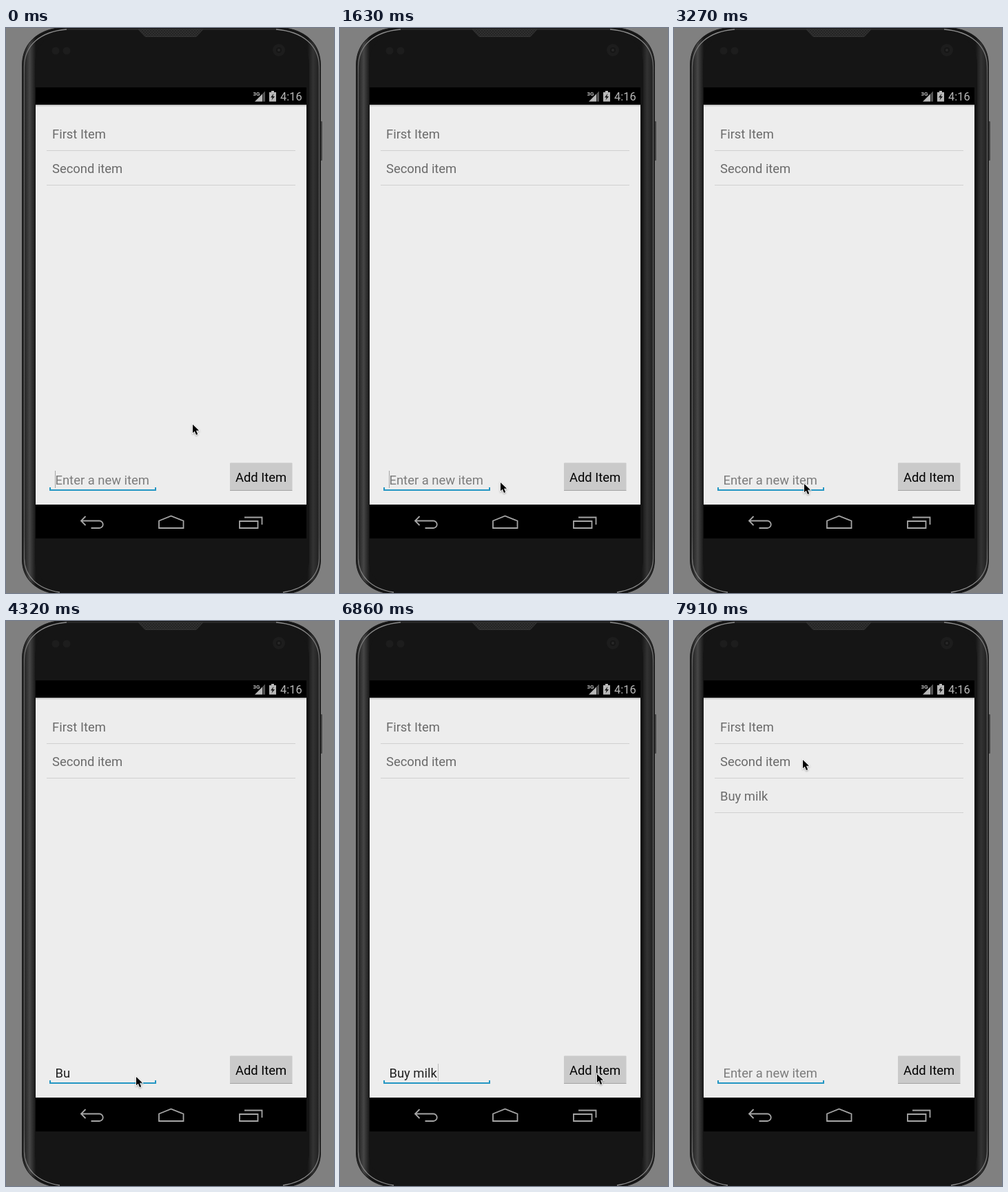
An HTML page that plays this animation: 476 by 818 pixels, repeating every 8 s.

```html
<!DOCTYPE html>
<html lang="en">
<head>
<meta charset="utf-8">
<title>Item list</title>
<style>
html, body { margin: 0; width: 100%; height: 100%; overflow: hidden; background: #808080; }
svg { display: block; width: 476px; height: 818px; font: 18.4px Roboto, sans-serif; }
.list { fill: #6b6b6b; }
.rule { stroke: #d0d0d0; }
.icon { fill: none; stroke: #a6a6a6; stroke-width: 1.8; }
text { white-space: pre; }
</style>
</head>
<body>
<svg viewBox="0 0 476 818">
  <defs>
    <linearGradient id="body">
      <stop offset="0" stop-color="#1c1c1c"/>
      <stop offset=".012" stop-color="#2c2c2c"/>
      <stop offset=".025" stop-color="#464646"/>
      <stop offset=".046" stop-color="#151515"/>
      <stop offset=".956" stop-color="#151515"/>
      <stop offset=".975" stop-color="#333"/>
      <stop offset="1" stop-color="#1c1c1c"/>
    </linearGradient>
    <linearGradient id="rim" x1="0" y1="0" x2="0" y2="1">
      <stop offset="0" stop-color="#909090"/>
      <stop offset=".08" stop-color="#606060"/>
      <stop offset=".9" stop-color="#585858"/>
      <stop offset="1" stop-color="#909090"/>
    </linearGradient>
    <linearGradient id="shade" x1="0" y1="0" x2="0" y2="1">
      <stop offset="0" stop-color="#000" stop-opacity=".25"/>
      <stop offset="1" stop-color="#000" stop-opacity="0"/>
    </linearGradient>
    <pattern id="mesh" width="4" height="4" patternUnits="userSpaceOnUse">
      <path d="M0 4L4 0M0 0L4 4" stroke="#343434" stroke-width=".8"/>
    </pattern>
  </defs>

  <!-- handset -->
  <rect x="456" y="135" width="3" height="57" rx="1" fill="#444"/>
  <path fill="url(#body)" stroke="#1b1b1b" d="M82-1C46 2 23.500 22 23.500 54V770C23.500 796 42 816 76 820H404C438 816 456.500 796 456.500 770V54C456.500 22 434 2 398-1Z"/>
  <path fill="#151515" d="M88 4C56 8 42 28 42 54V770C42 792 56 810 84 815H396C424 810 440 792 440 770V54C440 28 424 8 392 4Z"/>
  <path fill="none" stroke="url(#rim)" stroke-width="1.300" d="M88 2C50 5 26.500 25 26.500 56V768C26.500 792 44 812 78 817M392 2C430 5 454.500 25 454.500 56V768C454.500 792 436 812 402 817"/>
  <path fill="none" stroke="#3c3c3c" d="M88 2H392"/>
  <path fill="#242424" stroke="#343434" d="M192 2H286L276 12.500H202Z"/>
  <path fill="url(#mesh)" d="M192 2H286L276 12.500H202Z"/>
  <g fill="#1d1d1d">
    <circle cx="72" cy="33" r="5.500"/>
    <circle cx="88" cy="33" r="5.500"/>
    <circle cx="396" cy="32" r="9"/>
  </g>
  <circle cx="396" cy="32" r="4" fill="#161616"/>
  <circle cx="396" cy="32" r="2" fill="#282828"/>

  <!-- screen -->
  <rect x="43" y="86" width="393" height="653"/>
  <rect x="43" y="111" width="393" height="579" fill="#ededed"/>
  <rect x="43" y="111" width="393" height="3" fill="url(#shade)"/>

  <!-- status bar -->
  <g fill="#b8b8b8">
    <text x="358.500" y="97.500" font-size="8" font-weight="700">3G</text>
    <path d="M361 106.500L372 95.500V106.500Z"/>
    <path fill="#555" d="M372.500 95L376 91.500V106.500H372.500Z"/>
    <path d="M385 91H389V93H392V106.500H382V93H385Z"/>
    <path fill="#111" d="M388.500 95L384 100.500H386.800L385.500 104.500L390 99H387.200Z"/>
    <text x="398" y="105" font-size="16.400">4:16</text>
  </g>

  <!-- list -->
  <g class="list">
    <text x="67" y="159.500">First Item</text>
    <text x="67" y="209.500">Second item</text>
  </g>
  <path class="rule" d="M59 177.500H420M59 227.500H420"/>
  <g id="added">
    <text class="list" x="67" y="259.500">Buy milk</text>
    <path class="rule" d="M59 277.500H420"/>
  </g>

  <!-- input row -->
  <path fill="none" stroke="#2496c3" stroke-width="2" d="M64 665V669H217V665"/>
  <text id="field" x="71.500" y="660.500"></text>
  <rect id="caret" y="641" width="1" height="25"/>
  <rect x="325" y="629.500" width="90.500" height="40" rx="1" fill="#cacaca"/>
  <path stroke="#a4a4a4" d="M325 669.500H415.500"/>
  <text x="333" y="656.500">Add Item</text>

  <!-- navigation bar -->
  <g class="icon">
    <path d="M115.500 707L109 713.500L115.500 720M109.500 713.500H135.500A5.200 5.200 0 0 1 135.500 724H123.500"/>
    <path d="M222 724V713.500L239.500 706.500L257.500 713.500V724Z"/>
    <path d="M339 714H365.500V724H339ZM346 708.500H371.500V719"/>
  </g>

  <path id="pointer" stroke="#fff" stroke-width="1.600" paint-order="stroke" style="filter:drop-shadow(0 1px 1px #0005)" d="M0 .5V12.800L2.800 10.200L5 15.400L7.200 14.400L5 9.300H9Z"/>
</svg>
<script>
const LOOP = 8000, ADDED = 7160;
const HINT = 'Enter a new item';

// time, typed text, caret x, caret opacity
const typing = [
  [0, '', 71, .3], [140, '', 71, 0], [740, '', 71, .3], [1190, '', 71, 0],
  [1630, '', 71, .3], [2220, '', 71, 0], [2670, '', 71, .3], [3270, '', 71, 0],
  [3420, 'B', 83, .5], [3720, 'Bu', 93, .5], [4320, 'Bu', 93, 0], [4770, 'Bu', 93, .5],
  [4920, 'Buy', 102, .5], [5060, 'Buy ', 107, .5], [5360, 'Buy m', 123, .5],
  [5510, 'Buy mi', 128, .6], [6110, 'Buy mi', 128, 0], [6260, 'Buy mil', 132, .4],
  [6410, 'Buy milk', 142, .2], [7010, 'Buy milk', 142, 0],
  [ADDED, '', 71, .3], [7760, '', 71, 0]
];

// time, pointer tip x, y
const moves = [
  [0, 271, 573.5], [740, 280, 605], [890, 312, 690], [1040, 346, 755], [1190, 338, 748],
  [1330, 305, 712], [1480, 262, 673], [1630, 233, 657.5], [1780, 220, 658],
  [1920, 202, 659], [2070, 189, 659.5], [6710, 300, 657], [6860, 373, 655.5],
  [7310, 353, 602], [7760, 280, 415], [7910, 187, 200.5]
];

const byId = id => document.getElementById(id);
const added = byId('added'), field = byId('field'), caret = byId('caret'), pointer = byId('pointer');
const stepAt = (steps, t) => steps.findLast(s => s[0] <= t);

function draw(t) {
  const [, text, caretX, alpha] = stepAt(typing, t);
  field.textContent = text || HINT;
  field.setAttribute('fill', text ? '#222' : '#7c7c7c');
  caret.setAttribute('x', caretX);
  caret.setAttribute('opacity', alpha);
  added.setAttribute('visibility', t >= ADDED ? 'visible' : 'hidden');
  const [, x, y] = stepAt(moves, t);
  pointer.setAttribute('transform', `translate(${x} ${y})`);
}

const start = performance.now();
function tick() {
  draw((performance.now() - start) % LOOP);
  requestAnimationFrame(tick);
}
tick();
</script>
</body>
</html>
```
